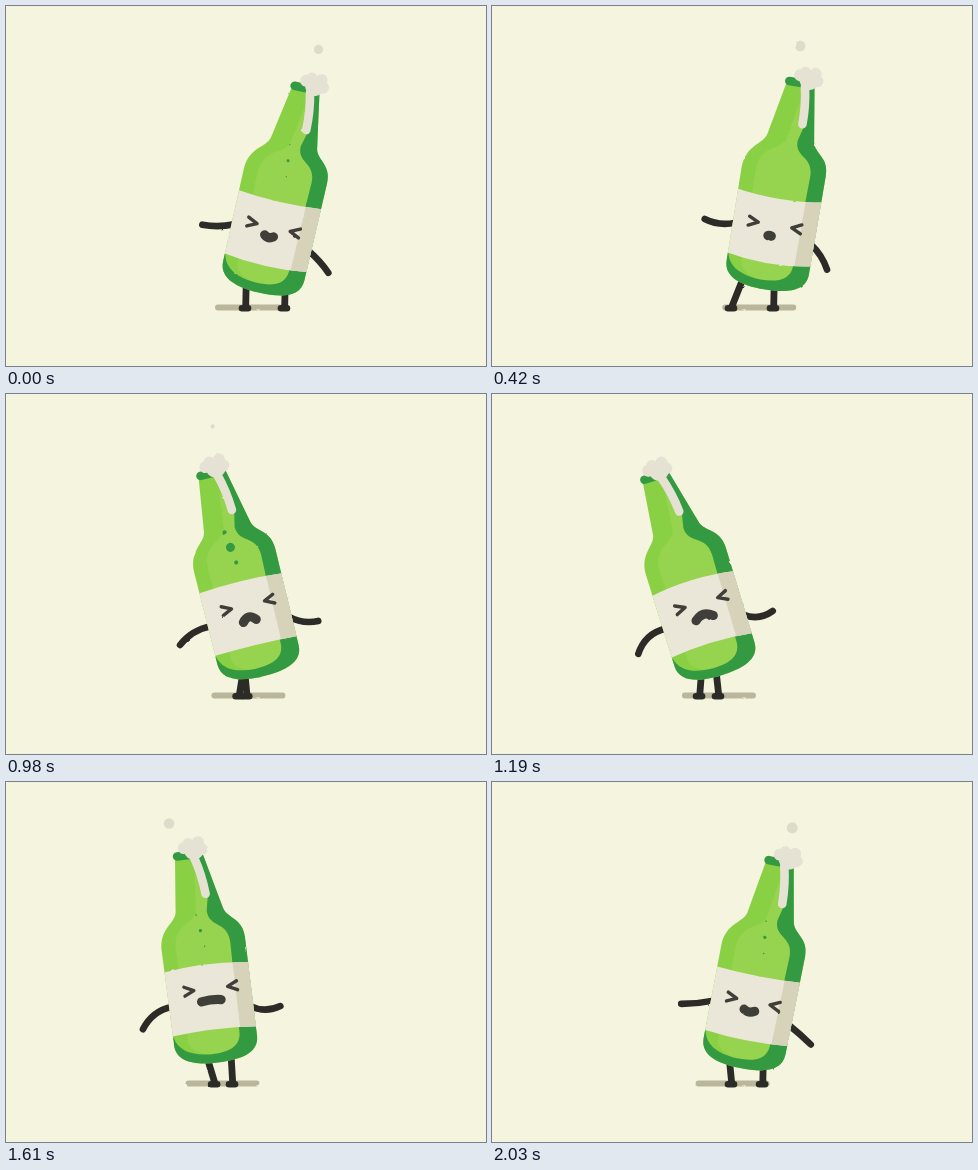
Write an HTML page with a canvas that moves like this. It is 480 px wide and 360 px high and loops after 2.1 s.

```html
<!DOCTYPE html>
<html lang="en">
<head>
<meta charset="utf-8">
<title>Dancing bottle</title>
<style>
  html, body { margin: 0; width: 100%; height: 100%; overflow: hidden; background: #f5f4df; }
  canvas { display: block; width: 480px; height: 360px; filter: url(#rough); }
  svg { position: absolute; width: 0; height: 0; }
</style>
</head>
<body>
<svg aria-hidden="true">
  <filter id="rough" x="0" y="0" width="100%" height="100%" color-interpolation-filters="sRGB">
    <feTurbulence type="fractalNoise" baseFrequency="0.14" numOctaves="1" seed="4"/>
    <feDisplacementMap in="SourceGraphic" scale="2" xChannelSelector="R" yChannelSelector="G"/>
  </filter>
</svg>
<canvas id="stage" width="480" height="360"></canvas>
<script>
const ctx = document.getElementById('stage').getContext('2d');
const STEP = 70, COUNT = 30, RAD = Math.PI / 180;
const INK = '#2c2b27', FEATURE = '#403e39', LIGHT = '#8ad044', BRIGHT = '#96d34f', DARK = '#349a41';
const LABEL = '#eae7d9', SHADE = '#d7d2ba', FOAM = '#e5e2d4', GROUND = '#b9b69c';

// Key poses of the sway, in steps; everything else follows from them.
const KEYS = [0, 3, 9, 14, 19, 23, 29];
const TILT = [13, 17.5, -2.5, -13.7, -17.7, -7, 11.2];
const BASE = [252.5, 262.5, 277, 257, 215.5, 212, 248];

// Periodic monotone cubic through the keys.
function sample(vals, i) {
  const n = KEYS.length;
  const time = k => KEYS[(k + n) % n] + COUNT * Math.floor(k / n);
  const val = k => vals[(k + n) % n];
  const rise = k => (val(k + 1) - val(k)) / (time(k + 1) - time(k));
  const slope = k => {
    const a = rise(k - 1), b = rise(k);
    return a * b <= 0 ? 0 : 2 * a * b / (a + b);
  };
  let k = n - 1;
  while (KEYS[k] > i) k--;
  const h = time(k + 1) - time(k), u = (i - time(k)) / h, v = 1 - u;
  return val(k) * (1 + 2 * u) * v * v + slope(k) * h * u * v * v
       + val(k + 1) * u * u * (3 - 2 * u) - slope(k + 1) * h * u * u * v;
}

function smooth(a, b, x) {
  const u = Math.min(1, Math.max(0, (x - a) / (b - a)));
  return u * u * (3 - 2 * u);
}

// A foot rests on the right, steps left, rests, and steps back.
function stepFoot(i, right, left, go, there, back, home) {
  const at = i < home - COUNT ? i + COUNT : i;
  return right + (left - right) * (smooth(go, there, at) - smooth(back, home, at));
}

function pose(i) {
  const a = 2 * Math.PI * i / COUNT, sin = Math.sin(a), cos = Math.cos(a);
  const tilt = sample(TILT, i), s = tilt / 17.5;
  return {
    tilt,
    x: sample(BASE, i),
    y: 283 + 2.6 * s + 1.5 * Math.cos(2 * a),
    bend: 3 * sin + 3 * s ** 3,
    mood: 0.7 * s + 0.4 * sin,
    shadow: 241.5 + 26 * Math.sin(a + 10 * RAD),
    footL: stepFoot(i, 239, 204, 12.5, 18, 21.5, 28.5),
    footR: stepFoot(i, 281, 226, 10, 16, 24, 31),
    mouthY: 12 - 2 * cos,
    mouthW: 6 - 4.3 * Math.sin(a + 20 * RAD),
    bow: 3 * cos - 1.2
  };
}

let p;

// Leans the neck a little further than the body.
function lean(x, y) {
  const u = Math.max(0, (-y - 95) / 117);
  return [x + p.bend * u * u, y];
}

function toStage(x, y) {
  const c = Math.cos(p.tilt * RAD), s = Math.sin(p.tilt * RAD);
  return [p.x + x * c - y * s, p.y + x * s + y * c];
}

// Segments: 2 numbers a line, 4 a quadratic, 6 a cubic.
function trace(start, ...segs) {
  const map = a => a.flatMap((v, k) => k % 2 ? [] : lean(v, a[k + 1]));
  const kinds = { 2: 'lineTo', 4: 'quadraticCurveTo', 6: 'bezierCurveTo' };
  ctx.beginPath();
  ctx.moveTo(...map(start));
  for (const s of segs) ctx[kinds[s.length]](...map(s));
}

function fill(color) { ctx.fillStyle = color; ctx.fill(); }

function stroke(color, width) {
  ctx.strokeStyle = color;
  ctx.lineWidth = width;
  ctx.lineCap = ctx.lineJoin = 'round';
  ctx.stroke();
}

function line(x0, y0, x1, y1, color, width) {
  ctx.beginPath();
  ctx.moveTo(x0, y0);
  ctx.lineTo(x1, y1);
  stroke(color, width);
}

function dot(x, y, r, color) {
  if (r <= 0.2) return;
  ctx.beginPath();
  ctx.arc(x, y, r, 0, 7);
  fill(color);
}

function arm(side, shoulderY, drop, length, curl) {
  const [x, y] = toStage(39 * side, shoulderY);
  const dx = side * length * Math.cos(drop * RAD), dy = length * Math.sin(drop * RAD);
  const k = 2 * curl / length;
  ctx.beginPath();
  ctx.moveTo(x, y);
  ctx.quadraticCurveTo(x + dx / 2 + dy * k, y + dy / 2 - dx * k, x + dx, y + dy);
  stroke(INK, 6.6);
}

function leg(hip, foot) {
  line(...toStage(hip, -8), foot + 0.7, 301, INK, 6.8);
  line(foot - 3, 302.3, foot + 3, 302.3, INK, 6.6);
}

function fizz(i) {
  for (const [at, size] of [[14, 4.5], [23, 1.7], [29, 1.7]]) {
    const d = (i - at + 45) % COUNT - 15;
    if (Math.abs(d) > 3) continue;
    for (let k = 0; k < 3; k++) {
      const r = size * (k === 1 ? 1 : 0.45) * Math.cos(d * 30 * RAD);
      dot(...lean(1 - 2 * k, -117 - 16 * k - 2 * d), r, DARK);
    }
  }
}

function glass(i) {
  ctx.save();
  trace([-14.5, -210], [-23, -154], [-25, -143, -42, -140, -42.2, -117], [-41.5, -22],
    [-41, -4, -20, 0, 0, 0], [22, 0, 42, -4, 42, -22], [42.2, -122],
    [42, -141, 27, -142, 24.5, -153], [13, -210]);
  fill(LIGHT);
  ctx.clip();
  trace([2, -190], [-3, -152], [-8, -140, -27, -142, -28, -118], [-27, -24],
    [-25, -8, 0, -6, 30, -6], [30, -150]);
  fill(BRIGHT);
  trace([4, -213], [11, -185], [11, -165], [8, -152], [8, -134, 27, -140, 27, -118],
    [25, -27], [24, -12, 10, -9, -5, -9], [-28, -10, -38, -18, -41, -30],
    [-52, -30], [-52, 10], [52, 10], [52, -215]);
  fill(DARK);
  fizz(i);

  // The label's edges bow with the sway.
  const sag = 10 * p.mood;
  const top = [[-46, -95.5], [0, -95.5 + sag, 46, -95.5]];
  trace(...top, [46, -31], [0, -29 + sag, -46, -31]);
  fill(LABEL);
  ctx.clip();
  trace([27, -120], [50, -120], [50, 0], [26, 0]);
  fill(SHADE);
  ctx.restore();
}

function face() {
  const x = 1.2 - 1.5 * p.tilt / 17.5, y = -70 + 6.4 * p.mood;
  for (const d of [-1, 1]) {
    const tip = x + 17 * d;
    trace([tip + 9.5 * d, y - 4.5], [tip, y], [tip + 9.5 * d, y + 4.5]);
    stroke(FEATURE, 3.4);
  }
  const mx = -1 - 2.8 * p.mood, my = y + p.mouthY, w = p.mouthW;
  trace([mx - w, my - p.bow / 2], [mx, my + p.bow * 1.5, mx + w, my - p.bow / 2]);
  stroke(FEATURE, 9.2);
}

function foam() {
  trace([-12.5, -209.5], [4, -209.5]);
  stroke(DARK, 8.5);
  trace([4, -207], [9, -188, 9.5, -169]);
  stroke(FOAM, 8.6);
  const shift = p.tilt * 0.12 + p.bend;
  for (const [x, y, r] of [[6, -214, 10], [-4, -217, 6], [1, -221, 5.5], [11, -221, 6], [14, -214, 6]])
    dot(x + shift, y, r, FOAM);
}

// Puffs of froth rise off the mouth: birth step and sideways drift.
function froth(i) {
  const life = 6.5, [mx, my] = toStage(...lean(4, -217));
  for (const [born, drift] of [[2, -7], [8.3, -2], [20.5, -23], [25.5, 6]]) {
    const u = (i - born + COUNT) % COUNT / life;
    if (u < 1) dot(mx + drift, my - 12 - 30 * u, 5.6 * Math.sin(Math.PI * u), '#dedbcb');
  }
}

function draw(i) {
  p = pose(i);
  const m = p.mood;
  ctx.clearRect(0, 0, 480, 360);
  line(p.shadow - 34, 301.5, p.shadow + 34, 301.5, GROUND, 6);
  leg(0.4 * (p.footL - p.x) - 9, p.footL);
  leg(p.footR - p.x, p.footR);
  arm(-1, -61, 17 - 31 * m, 34 - 4 * m, 5 * m - 1);
  arm(1, -52, 27 + 40 * m, 30, 3.8 * m - 1);
  froth(i);
  ctx.save();
  ctx.translate(p.x, p.y);
  ctx.rotate(p.tilt * RAD);
  glass(i);
  face();
  foam();
  ctx.restore();
}

const start = performance.now();
function tick() {
  draw(Math.floor((performance.now() - start) / STEP) % COUNT);
  requestAnimationFrame(tick);
}
tick();
</script>
</body>
</html>
```
